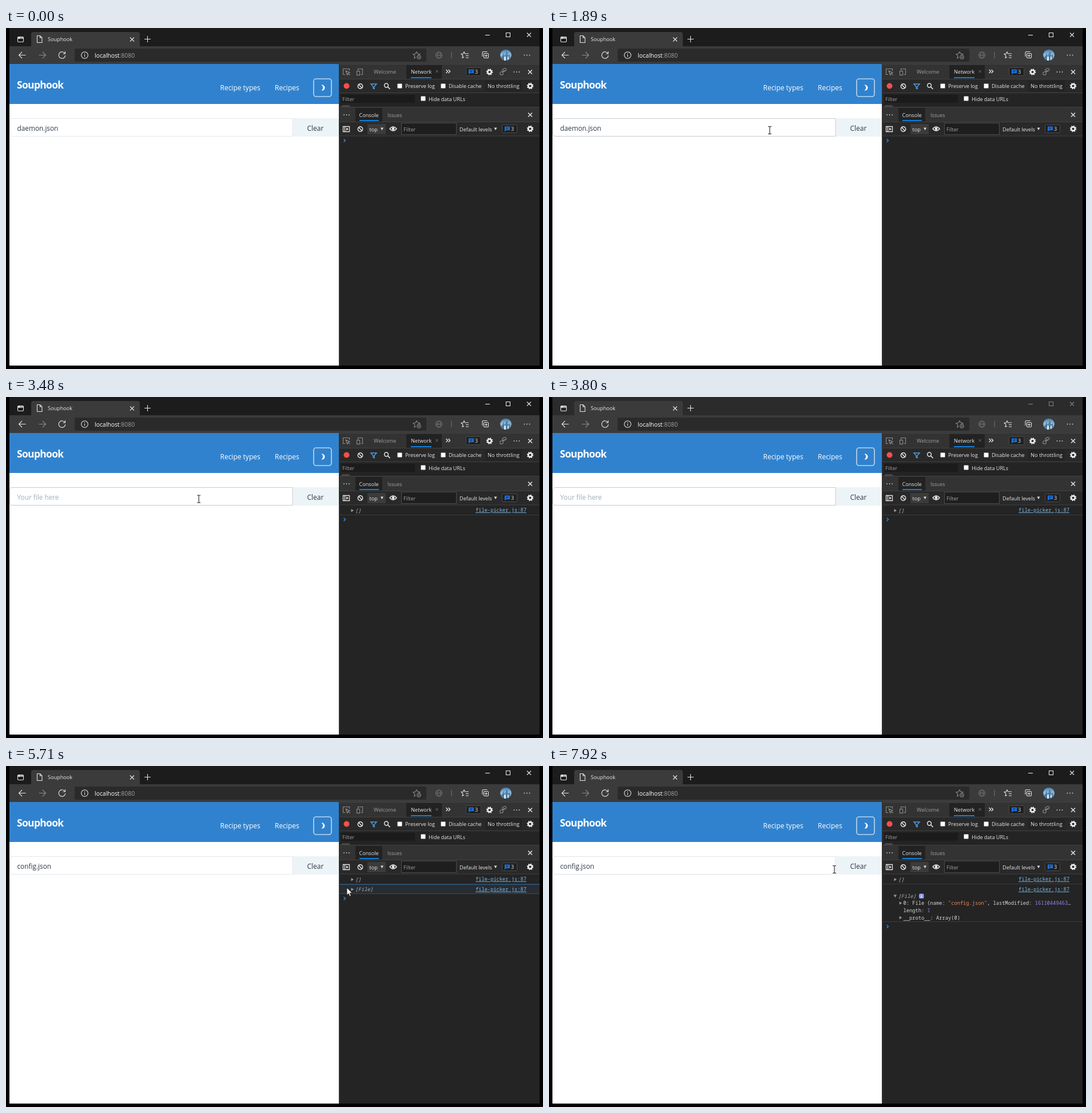
Animation of 939x597 px, one loop 8000 ms. Source, as an HTML page:

```html
<!DOCTYPE html>
<html lang="en">
<head>
<meta charset="utf-8">
<title>File picker demo</title>
<style>
  html, body { margin: 0; width: 100%; height: 100%; overflow: hidden; background: #000; }
  svg { display: block; width: 100vw; height: 100vh; }
  text { font-family: "Open Sans", "Noto Sans", sans-serif; font-size: 9.1px; fill: #e8e8e8; white-space: pre; }
  .page text { font-size: 12px; fill: #2d3748; }
  .head text { fill: #fff; }
  .mono text { font-family: "Noto Sans Mono", "DejaVu Sans Mono", monospace; font-size: 8.72px; fill: #d6d6d6; }
  .mono .it { font-style: italic; fill: #b0b0b0; }
  .mono .link { fill: #7fb8e4; text-decoration: underline; }
  .dim { fill: #a0a0a0; }
  .ic { fill: none; stroke: #e4e4e4; stroke-width: 1.1; }
  .soft { stroke: #8c8c8c; }
  .tri { fill: #9a9a9a; }
</style>
</head>
<body>
<svg viewBox="0 0 939 597" preserveAspectRatio="none">
  <defs>
    <path id="cross" d="M-3.5-3.5 3.5 3.5M3.5-3.5-3.5 3.5"/>
    <g id="gear">
      <circle r="3.3" fill="none" stroke="#f0f0f0" stroke-width="2.4"/>
      <circle r="4.9" fill="none" stroke="#f0f0f0" stroke-width="1.7" stroke-dasharray="1.9 1.95"/>
    </g>
    <g id="ban" fill="none" stroke="#e8e8e8" stroke-width="1.4"><circle r="4.2"/><path d="M-3-3 3 3"/></g>
    <g id="dots" fill="#ccc"><circle cx="-4.5" r=".9"/><circle r=".9"/><circle cx="4.5" r=".9"/></g>
    <g id="badge">
      <rect x=".5" y=".5" width="26" height="14" rx="1" fill="#202020" stroke="#4a4a4a"/>
      <path d="M5 3.5h9v6.5h-6.500l-2.500 2.500z" fill="#1a73e8"/>
      <path d="M7 5.700h5M7 7.700h4" stroke="#202020" stroke-width=".8"/>
      <text x="16" y="11">3</text>
    </g>
    <linearGradient id="photo" x2="0" y2="1">
      <stop stop-color="#3f7fb8"/><stop offset=".5" stop-color="#9cc4e0"/><stop offset="1" stop-color="#36648c"/>
    </linearGradient>
  </defs>

  <rect width="939" height="597"/>

  <!-- window frame -->
  <rect id="titlebar" x="6" width="927" height="32"/>
  <path d="M44 32V11q0-4 4-4H230q4 0 4 4V32H933V63H6V32z" fill="#3b3b3b"/>
  <rect x="120" y="36" width="615" height="23" rx="2" fill="#2a2a2a"/>
  <g class="ic">
    <rect x="20.500" y="15.500" width="10" height="9" rx="1.500"/><path d="M20.500 17.500h10M23 16v3" stroke-width="2"/>
    <path d="M54.500 13.500h5l3.500 3.500v8.500h-8.500zM59.500 13.500v3.500h3.500"/>
    <use href="#cross" transform="translate(220.500 20)"/>
    <path d="M242 19.500h11M247.500 14v11"/>
    <path d="M34.500 47.500h-12M28 42l-5.500 5.500 5.500 5.500"/>
    <path class="soft" d="M57.500 47.500h12M64 42l5.500 5.500-5.500 5.500"/>
    <path d="M103 44.500a5.800 5.800 0 1 0 .8 3.500M103.500 41v4h-4"/>
    <circle cx="137.500" cy="47.500" r="5.800"/><path d="M137.500 46.500v4M137.500 44v1.300"/>
    <path class="soft" d="M718 41.500l1.800 3.600 4 .5-3 2.800M716.500 51.500l-2.500 1.500.8-4.300-3-2.900 4-.6 2-3.700"/>
    <circle class="soft" cx="722" cy="51" r="3.200"/><path class="soft" d="M720.500 51h3M722 49.500v3"/>
    <g stroke="#707070"><circle cx="757" cy="47.500" r="5.500"/><ellipse cx="757" cy="47.500" rx="2.500" ry="5.500"/><path d="M751.500 47.500h11M779 42v11"/></g>
    <path d="M801 41.500l1.500 3.500h6.500M804 48.500h5M804 52h5M801 41.500l-1.500 3.500-3.500.5 2.800 2.600-.8 4.200 3-1.500"/>
    <rect x="835.500" y="44.500" width="8" height="8" rx="1.500"/><path d="M833 50v-7q0-1.500 1.500-1.500h7M839.500 46v5M837 48.500h5"/>
  </g>
  <circle cx="874" cy="47.500" r="9.800" fill="url(#photo)"/>
  <path d="M866 53l4-9 2 5 4-8 2 7 4-2-2 7z" fill="#27506f" opacity=".55"/>
  <path d="M871 57v-7h3v7zM877 56v-6h2v5z" fill="#dcebf4"/>
  <use href="#dots" x="911" y="47.500"/>
  <g id="winbtns" class="ic"><path d="M838 12.500h8"/><rect x="874.500" y="8.500" width="7" height="7"/><use href="#cross" transform="translate(914.500 12)"/></g>
  <text x="73" y="23">Souphook</text>
  <text x="155" y="51.500" style="font-size:10.4px;fill:#fff">localhost<tspan fill="#a0a0a0">:8080</tspan></text>

  <!-- web page -->
  <g class="page">
    <rect x="6" y="63" width="576" height="528" fill="#fff"/>
    <g class="head">
      <rect x="6" y="63" width="576" height="70" fill="#3182ce"/>
      <text x="19" y="106" style="font-size:17.5px;font-weight:700;letter-spacing:-.7px">Souphook</text>
      <text x="374.500" y="109">Recipe types</text>
      <text x="470" y="109">Recipes</text>
      <rect x="538" y="89" width="31" height="31" rx="4" fill="none" stroke="#fff" stroke-width="1.100"/>
      <path d="M551.500 99.700a5 5 0 1 1 0 9.800a5.600 5.600 0 0 0 0-9.800z" fill="#fff"/>
    </g>
    <rect x="501" y="158" width="81" height="32" fill="#edf4f7"/>
    <path id="field" d="M501 158.500H11q-4 0-4 4V185.500q0 4 4 4H501z" fill="#fff"/>
    <text id="fileName" x="19.500" y="179.500" style="font-size:11.8px"></text>
    <rect id="ring" x="512.500" y="157" width="57" height="34.500" rx="4.500" fill="#e2e8f0" stroke="#8ebde8" stroke-width="2.800"/>
    <text x="526.500" y="179.500" style="font-weight:500">Clear</text>
  </g>

  <!-- developer tools -->
  <rect x="582" y="63" width="351" height="528" fill="#242424"/>
  <path d="M583 64h350v25H583zM583 138h350v26H583z" fill="#333"/>
  <path d="M583 89h350v24H583zM583 164h350v25H583z" fill="#292929"/>
  <path d="M700 65h62v24h-62zM611 140h47v24h-47z" fill="#222"/>
  <path d="M583 63.500h350M583 89.500h350M583 113.500h350M583 138.500h350M583 164.500h350M583 189h350" stroke="#414141"/>
  <path d="M708 87h36M618 162h34" stroke="#1081e0" stroke-width="2"/>
  <path d="M583 63.500V591" stroke="#363636"/>
  <rect x="587" y="117" width="128" height="14" fill="#1b1b1b"/>
  <path d="M586 138q1-3 4-3h8q3 0 4 3z" fill="#484848"/>
  <rect x="632" y="168" width="32" height="18" fill="#3b3b3b"/>
  <rect x="691.500" y="166.500" width="96" height="20" fill="#1e1e1e" stroke="#4c4c4c"/>
  <rect x="838" y="92" width="64" height="19" fill="#242424"/>
  <g class="ic">
    <path class="soft" d="M593 81.500h-3.500v-10h11V75M594 75l7 3-3 1.200-1.300 3zM598 79.500l3.500 3"/>
    <path class="soft" d="M615.500 74.500v-3h8v10h-3"/><rect class="soft" x="613.500" y="75.500" width="5" height="7"/>
    <use class="soft" href="#cross" transform="translate(753.500 76) scale(.65)"/>
    <path d="M769.500 73l3 3-3 3M773.500 73l3 3-3 3" stroke-width="1.400"/>
    <g class="soft"><rect x="868" y="71.500" width="7" height="4.500" rx="2" transform="rotate(-30 871 74)"/><circle cx="866.500" cy="79.500" r="2.800"/><path d="M868 77l4-3"/></g>
    <use href="#cross" transform="translate(916.500 77)" stroke-width="1.500"/>
    <use href="#cross" transform="translate(916.500 152)" stroke-width="1.500"/>
    <path d="M638 98h10l-4 4.500v4l-2-1v-3z" stroke="#4f9ee3" stroke-width="1.400"/>
    <circle cx="665" cy="100.500" r="3.400" stroke-width="1.500"/><path d="M667.500 103l4 4" stroke-width="1.700"/>
    <path d="M589.500 172.500h11v9h-11zM592.500 172.500v9" stroke-width="1.300"/><path d="M595 174.500l4 2.500-4 2.500z" fill="#e4e4e4" stroke="none"/>
    <path d="M671 176.500q6-7 12 0q-6 7-12 0z" stroke-width="1.400"/><circle cx="677" cy="176.500" r="1.900" fill="#fff"/>
  </g>
  <circle cx="595.500" cy="101.500" r="5" fill="#f25050"/>
  <use href="#ban" x="619.500" y="102"/><use href="#ban" x="619.500" y="177"/>
  <use href="#gear" x="845.500" y="77"/><use href="#gear" x="916.500" y="101.500"/><use href="#gear" x="916.500" y="176.500"/>
  <use href="#dots" x="893" y="77"/><use href="#dots" x="595.500" y="152"/>
  <use href="#badge" x="804" y="69"/><use href="#badge" x="867" y="169"/>
  <g fill="#fff" stroke="#888" stroke-width=".6">
    <rect x="684.500" y="97.500" width="8" height="8" rx="1"/><rect x="760.500" y="97.500" width="8" height="8" rx="1"/><rect x="725.500" y="119.500" width="8" height="8" rx="1"/>
  </g>
  <path d="M655 174.500h5l-2.500 4.500zM853.500 174.500h5l-2.500 4.500z" fill="#ddd"/>
  <text x="643" y="80" class="dim">Welcome</text>
  <text x="708" y="80" fill="#fff">Network</text>
  <text x="698" y="105">Preserve log</text>
  <text x="774" y="105" style="font-size:9px">Disable cache</text>
  <text x="842" y="105" style="font-size:9.400px">No throttling</text>
  <text x="588" y="128" class="dim">Filter</text>
  <text x="739" y="127.500" style="font-size:9px">Hide data URLs</text>
  <text x="617.500" y="155.500" fill="#fff">Console</text>
  <text x="667" y="155.500" class="dim" style="font-size:8.800px">Issues</text>
  <text x="635.500" y="180.500">top</text>
  <text x="695" y="180.500" class="dim">Filter</text>
  <text x="793" y="180.500">Default levels</text>

  <!-- console output -->
  <g class="mono">
    <g id="emptyLog">
      <path class="tri" d="M603.500 196l4.500 2.700-4.500 2.700z"/>
      <text class="it" x="610.500" y="202">[]</text>
      <text class="link" x="821" y="201">file-picker.js:87</text>
      <path d="M583 206.500h350" stroke="#3c3c3c"/>
    </g>
    <g id="fileLog">
      <g id="rowFocus"><rect x="583" y="207" width="350" height="17" fill="#282d33"/><path d="M583 207.500h350M583 223.500h350" stroke="#24608f"/></g>
      <text class="link" x="821" y="219">file-picker.js:87</text>
    </g>
    <g id="folded">
      <path class="tri" d="M603.500 213.300l4.500 2.700-4.500 2.700z"/>
      <text class="it" x="610.500" y="219">[File]</text>
      <path d="M583 223.500h350" stroke="#3c3c3c" opacity=".5"/>
    </g>
    <g id="unfolded">
      <path class="tri" d="M602.500 225.500h5.500l-2.750 4.700zM612.700 237.300l4.500 2.700-4.500 2.700zM612.700 262.800l4.500 2.700-4.500 2.700z"/>
      <text class="it" x="610.500" y="231">[File]</text>
      <rect x="647" y="223.500" width="8.500" height="8.500" rx="2" fill="#8f9cf0"/>
      <path d="M651.200 225.300v1M651.200 227.300v3" stroke="#fff" stroke-width="1.200"/>
      <text x="619.500" y="243">0: File {name: <tspan fill="#f0885c">"config.json"</tspan>, lastModified: <tspan fill="#9a80f5">16110449463</tspan>…</text>
      <text x="619.500" y="256">length: <tspan fill="#9a80f5">1</tspan></text>
      <text x="619.500" y="268.500">__proto__: Array(0)</text>
      <path d="M583 272.500h350" stroke="#3c3c3c"/>
    </g>
  </g>
  <path id="prompt" d="M590.500-2.700l3 2.700-3 2.700" fill="none" stroke="#3b8ee8" stroke-width="1.300"/>

  <!-- mouse pointers, hot spot at 0,0 -->
  <g id="arrow"><path d="M0 0V13.200L3 10.400 5.100 15.200 7.300 14.200 5.200 9.600H9.200z" fill="#fff" stroke="#222" stroke-width=".9"/></g>
  <g id="beam"><path d="M-3-6.500h2q1 0 1 1q0-1 1-1h2M-3 6.500h2q1 0 1-1q0 1 1 1h2M0-5.500V5.500" fill="none" stroke="#222" stroke-width="1.100"/></g>
  <g id="hand"><path d="M-2 10V1.500q0-1.700 1.500-1.700T1 1.500V6q2.400-.8 2.900.9 2-.7 2.500.8 1.700-.3 1.700 1.600V13q0 2-1.500 3.500V18.500H-1V16.500L-5.600 11q-.8-1.500.6-2.200T-2 10zM1 6v3.500M3.900 7v3M6.400 8v2.500" fill="#fff" stroke="#222" stroke-width="1"/></g>
</svg>
<script>
  const LOOP = 8000, STEP = 105;
  const CLEAR = 2520, DIALOG = 3700, BACK = 4560, PICKED = 4660, ROW = 5600, UNFOLD = 6630;
  const $ = id => document.getElementById(id);
  const show = (id, on) => $(id).setAttribute("display", on ? "inline" : "none");
  const clamp = v => Math.max(0, Math.min(1, v));
  const mix = (a, b, k) => `rgb(${a.map((v, i) => Math.round(v + (b[i] - v) * k))})`;

  // bursts of mouse movement: start, number of steps, waypoints
  const moves = [
    [120, 8, [[737, 418], [610, 300], [470, 215], [390, 178]]],
    [940, 8, [[350, 176], [240, 168], [290, 172], [380, 177]]],
    [1890, 5, [[386, 179], [440, 182], [505, 184], [541, 183], [531, 183]]],
    [3050, 8, [[531, 183], [430, 180], [300, 178], [215, 179]]],
    [BACK, 8, [[211, 231], [212, 246], [300, 236], [440, 222]]],
    [5390, 8, [[500, 218], [550, 214], [580, 212], [596, 213], [599, 213], [601, 212], [602, 212], [603, 213]]],
    [6210, 3, [[604, 213], [602, 214], [600, 214]]],
    [7710, 3, [[580, 205], [535, 190], [499, 181]]]
  ];
  const hovers = [[690, 2050], [3200, BACK], [7880, LOOP]];

  function pointer(t) {
    const move = moves.filter(m => m[0] <= t).pop();
    if (!move || (t >= DIALOG && t < BACK)) return null;
    const [start, steps, pts] = move;
    const i = Math.min(steps - 1, Math.floor((t - start) / STEP + 0.1));
    const u = i / (steps - 1) * (pts.length - 1);
    const a = Math.min(pts.length - 2, Math.floor(u + 1e-6));
    return pts[a].map((v, k) => v + (pts[a + 1][k] - v) * (u - a));
  }

  function pointerKind([x, y]) {
    if (y < 158 || y > 191) return "arrow";
    if (x < 501) return "beam";
    return x > 511 && x < 571 ? "hand" : "arrow";
  }

  function drawPointer(t) {
    const pos = pointer(t), kind = pos && pointerKind(pos);
    for (const id of ["arrow", "beam", "hand"]) show(id, id === kind);
    if (pos) $(kind).setAttribute("transform", `translate(${pos})`);
  }

  function fieldBorder(t) {
    if (t >= BACK && t < ROW) return "#93afc4";
    const h = hovers.find(([from, to]) => t >= from && t < to);
    return mix([228, 234, 240], [196, 204, 212], h ? clamp((t - h[0]) / 200) : 0);
  }

  function render(t) {
    const away = t >= DIALOG && t < BACK;
    $("titlebar").setAttribute("fill", away ? "#2b2b2b" : "#1c1c1c");
    $("winbtns").setAttribute("opacity", away ? 0.45 : 1);

    const empty = t >= CLEAR && t < PICKED;
    $("fileName").textContent = empty ? "Your file here" : t < CLEAR ? "daemon.json" : "config.json";
    $("fileName").style.fill = empty ? "#9fb0ba" : "#2d3748";
    $("field").setAttribute("stroke", fieldBorder(t));
    $("ring").setAttribute("opacity", t < 3480 ? clamp((t - CLEAR + 70) / 200) : 0);

    show("emptyLog", t >= CLEAR);
    show("fileLog", t >= PICKED);
    show("rowFocus", t >= ROW && t < UNFOLD);
    show("folded", t >= PICKED && t < UNFOLD);
    show("unfolded", t >= UNFOLD);
    const y = t < CLEAR ? 197 : t < PICKED ? 214.5 : t < UNFOLD ? 232 : 281;
    $("prompt").setAttribute("transform", `translate(0 ${y})`);
    drawPointer(t);
  }

  const begin = performance.now();
  function tick() {
    render((performance.now() - begin) % LOOP);
    requestAnimationFrame(tick);
  }
  tick();
</script>
</body>
</html>
```
